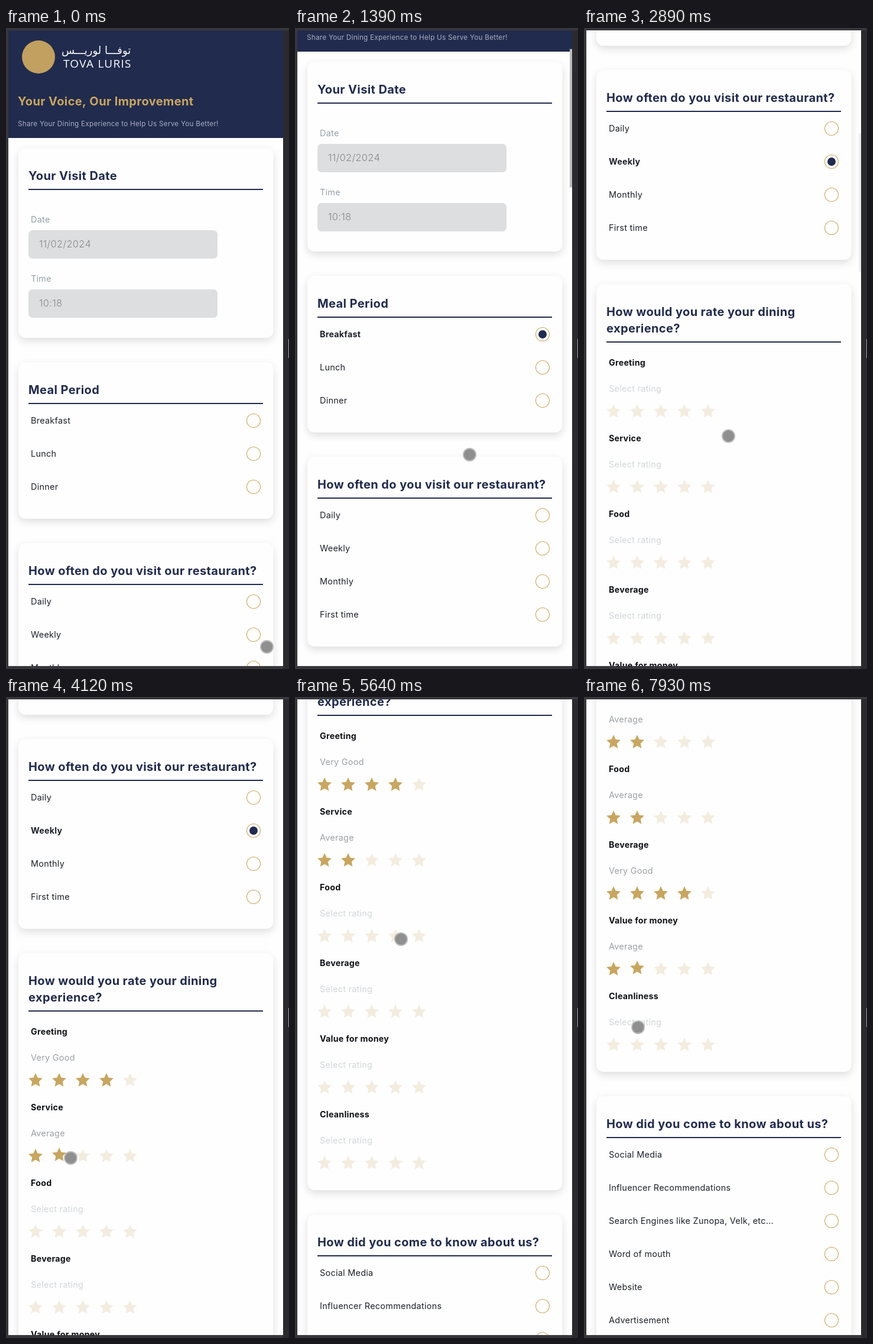
Animation, 479 px wide and 1084 px high, one loop 7990 ms. Source, as an HTML page with a canvas:

```html
<!DOCTYPE html>
<html lang="en">
<head>
<meta charset="utf-8">
<title>Dining feedback form</title>
<style>
html, body { margin: 0; width: 100%; height: 100%; overflow: hidden; background: #38373b; }
canvas { display: block; width: 479px; height: 1084px; }
</style>
</head>
<body>
<canvas id="stage" width="479" height="1084"></canvas>
<script>
const ctx = document.getElementById('stage').getContext('2d');
const LOOP = 7990;
const VIEW = { x: 4, y: 4, w: 465, h: 1075 };
const PAGE_HEIGHT = 4939;
const NAVY = '#212b4d', GOLD = '#c8a661', INK = '#1c2029';
const SANS = 'Inter, "Open Sans", sans-serif';

// Start, end, from, to
const scrolls = [
  [1190, 1600, 0, 300],
  [2038, 2360, 300, 800],
  [4190, 4800, 800, 1300],
  [6980, 7350, 1300, 1500]
];

// Time, x, y
const pointer = [
  [60, 441, 1046], [710, 321, 661], [900, 321, 661], [1110, 312, 683],
  [1290, 295, 721], [2720, 295, 721], [3090, 180, 650], [3420, 180, 650],
  [3840, 98, 778], [4050, 98, 778], [4120, 109, 779], [4780, 207, 585],
  [4910, 207, 585], [5100, 175, 543], [5200, 175, 543], [5640, 179, 409],
  [5960, 91, 405], [6160, 91, 405], [6580, 170, 532], [6790, 170, 532],
  [6930, 166, 577], [7420, 91, 461], [7740, 91, 461], [7930, 91, 558]
];

const choices = [
  { title: 'Meal Period', top: 565, bottom: 830, picked: 0, at: 860,
    items: ['Breakfast', 'Lunch', 'Dinner'] },
  { title: 'How often do you visit our restaurant?', top: 871, bottom: 1192, picked: 1, at: 1680,
    items: ['Daily', 'Weekly', 'Monthly', 'First time'] },
  { title: 'How did you come to know about us?', top: 2175, bottom: 2900, picked: -1,
    items: ['Social Media', 'Influencer Recommendations',
      'Search Engines like Zunopa, Velk, etc...', 'Word of mouth', 'Website', 'Advertisement'] }
];

// "until" is when the tapped star drops back
const ratings = [
  { name: 'Greeting', stars: 4, at: 3290, until: 3900 },
  { name: 'Service', stars: 2, at: 3900, until: 4190 },
  { name: 'Food', stars: 2, at: 6040, until: 6670 },
  { name: 'Beverage', stars: 4, at: 6670, until: 6980 },
  { name: 'Value for money', stars: 2, at: 7500, until: 9000 },
  { name: 'Cleanliness', stars: 0, at: Infinity, until: Infinity }
];
const words = { 2: 'Average', 4: 'Very Good' };

const clamp = v => Math.max(0, Math.min(1, v));
const ramp = (t, from, span) => clamp((t - from) / span);
const smooth = u => u * u * (3 - 2 * u);
const mix = (a, b, u) => a + (b - a) * u;

function scrollAt(t) {
  let y = 0;
  for (const [start, end, from, to] of scrolls) {
    if (t >= start) y = mix(from, to, smooth(ramp(t, start, end - start)));
  }
  return y;
}

function barAlpha(t) {
  return Math.max(...scrolls.map(([start, end]) =>
    t < start ? 0 : 1 - ramp(t, end + 450, 110)));
}

function pointerAt(t) {
  const i = pointer.findIndex(p => p[0] > t);
  if (i === 0) return pointer[0].slice(1);
  if (i < 0) return pointer[pointer.length - 1].slice(1);
  const [t0, x0, y0] = pointer[i - 1], [t1, x1, y1] = pointer[i];
  const u = smooth((t - t0) / (t1 - t0));
  return [mix(x0, x1, u), mix(y0, y1, u)];
}

function text(str, x, y, size, weight, color, family = SANS, spacing = 0.02) {
  ctx.font = `${weight} ${size}px ${family}`;
  ctx.letterSpacing = `${size * spacing}px`;
  ctx.fillStyle = color;
  ctx.fillText(str, x, y);
}

function box(x, y, w, h, r, color) {
  ctx.fillStyle = color;
  ctx.beginPath();
  ctx.roundRect(x, y, w, h, r);
  ctx.fill();
}

function disc(x, y, r, color) {
  ctx.fillStyle = color;
  ctx.beginPath();
  ctx.arc(x, y, r, 0, 7);
  ctx.fill();
}

function card(top, bottom, ...lines) {
  ctx.save();
  ctx.shadowColor = 'rgba(0,0,0,0.13)';
  ctx.shadowBlur = 14;
  ctx.shadowOffsetY = 5;
  box(21, top, 431.5, bottom - top, 12, '#fefefe');
  ctx.restore();
  lines.forEach((line, i) => text(line, 38, top + 54 + i * 28, 20, 700, NAVY));
  ctx.fillStyle = NAVY;
  ctx.fillRect(38, top + 41 + lines.length * 28, 397, 2);
}

function field(label, value, y) {
  text(label, 42, y + 5, 14.4, 400, '#93a1a8');
  box(38, y + 18, 320, 48, 7, '#dddedf');
  text(value, 56, y + 47, 16.4, 300, '#85878a');
}

function header() {
  ctx.fillStyle = NAVY;
  ctx.fillRect(4, 4, 465, 182);
  disc(55, 49, 28, '#c2a060');
  ctx.textAlign = 'right';
  text('توفـــا لوريـــس', 224, 44, 18, 400, '#fff', '"DejaVu Sans", sans-serif', 0);
  ctx.textAlign = 'left';
  text('TOVA LURIS', 97, 67, 19, 400, '#fff', '"Open Sans", sans-serif', 0.065);
  text('Your Voice, Our Improvement', 20, 131, 20, 700, GOLD);
  text('Share Your Dining Experience to Help Us Serve You Better!', 20, 166, 11.75, 400, '#a9aec1');
}

function radioCard(q, t) {
  card(q.top, q.bottom, q.title);
  q.items.forEach((item, i) => {
    const y = q.top + 99 + i * 56;
    const on = i === q.picked && t >= q.at;
    text(item, 42, y + 5, on ? 14.2 : 14.4, on ? 700 : 400, INK);
    ctx.strokeStyle = '#cba65c';
    ctx.lineWidth = 1.1;
    ctx.beginPath();
    ctx.arc(419, y, 11.5, 0, 7);
    ctx.stroke();
    if (on) disc(419, y, 7 * mix(0.5, 1, ramp(t, q.at, 100)), NAVY);
  });
}

function star(x, y, color) {
  ctx.fillStyle = color;
  ctx.beginPath();
  for (let i = 0; i < 10; i++) {
    const r = i % 2 ? 6 : 12.5, a = i * Math.PI / 5;
    ctx.lineTo(x + r * Math.sin(a), y - r * Math.cos(a));
  }
  ctx.fill();
}

function ratingCard(t) {
  card(1233, 2134, 'How would you rate your dining', 'experience?');
  ratings.forEach((row, k) => {
    const y = 1366 + k * 128, on = t >= row.at;
    const fill = ramp(t, row.at, 130);
    const lift = 2 * fill * (1 - ramp(t, row.until, 130));
    text(row.name, 42, y + 5, 14.2, 700, '#0f1116');
    text(on ? words[row.stars] : 'Select rating', 42, y + 49, 14.4, 400, on ? '#9b9fa3' : '#d1d6d8');
    for (let i = 0; i < 5; i++) {
      const x = 50 + i * 40, cy = y + 82.6 - (i === row.stars - 1 ? lift : 0);
      star(x, cy, '#f3ecdf');
      if (on && i < row.stars) {
        ctx.globalAlpha = fill;
        star(x, cy, GOLD);
        ctx.globalAlpha = 1;
      }
    }
  });
}

function frame() {
  ctx.fillStyle = '#38373b';
  ctx.fillRect(0, 0, 479, 1084);
  ctx.fillStyle = '#2b2a2e';
  ctx.fillRect(469, 4, 10, 1080);
  ctx.fillStyle = '#a4a9ae';
  ctx.fillRect(478, 526, 1, 32);
}

function draw(t) {
  const y = scrollAt(t);
  frame();
  ctx.save();
  ctx.beginPath();
  ctx.rect(VIEW.x, VIEW.y, VIEW.w, VIEW.h);
  ctx.clip();
  ctx.fillStyle = '#fefefe';
  ctx.fillRect(VIEW.x, VIEW.y, VIEW.w, VIEW.h);

  ctx.save();
  ctx.translate(0, -Math.round(y));
  header();
  card(203, 524, 'Your Visit Date');
  field('Date', '11/02/2024', 324);
  field('Time', '10:18', 424);
  choices.forEach(q => radioCard(q, t));
  ratingCard(t);
  ctx.restore();

  const scale = VIEW.h / PAGE_HEIGHT;
  ctx.globalAlpha = barAlpha(t);
  ctx.fillStyle = '#bdbdbd';
  ctx.fillRect(465, VIEW.y + y * scale, 4, VIEW.h * scale);
  ctx.globalAlpha = 1;

  const [px, py] = pointerAt(t);
  ctx.translate(0.5, 0.5);
  disc(px, py, 11.5, 'rgba(150,150,150,0.65)');
  disc(px, py, 9.6, 'rgba(135,135,135,0.85)');
  ctx.restore();
}

function tick() {
  draw(performance.now() % LOOP);
  requestAnimationFrame(tick);
}
tick();
</script>
</body>
</html>
```
